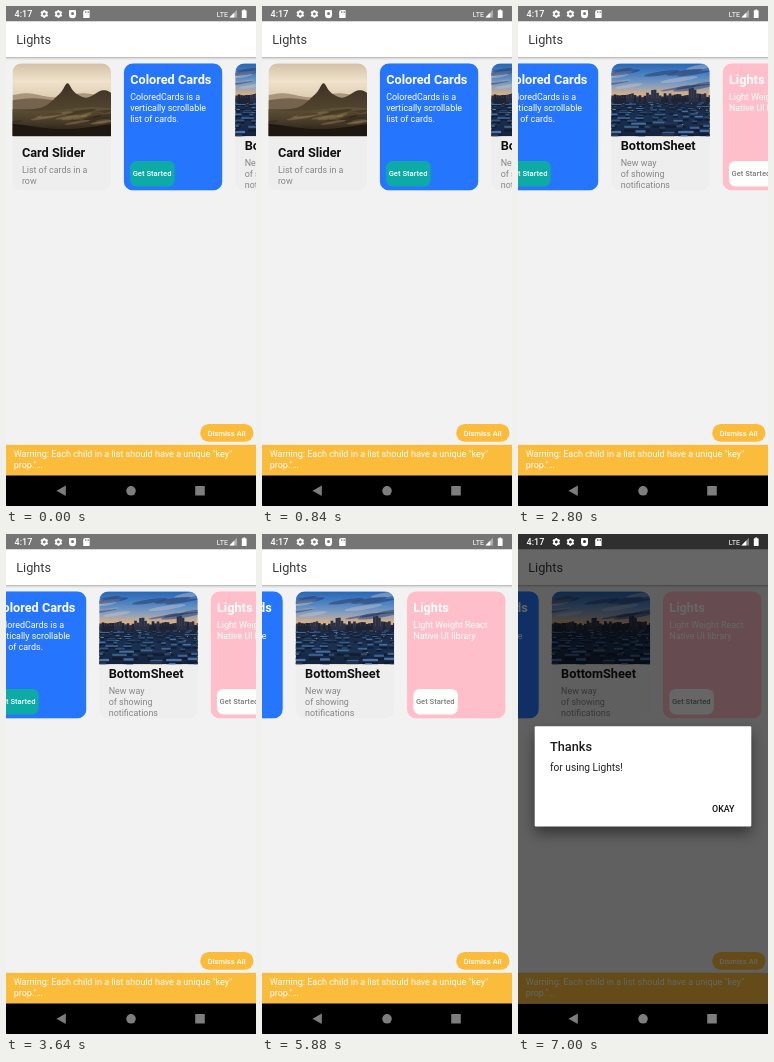
An HTML page with a canvas for the animation above (8.4 s loop, 250 by 500 pixels).

```html
<!DOCTYPE html>
<html lang="en">
<head>
<meta charset="utf-8">
<title>Lights</title>
<style>
html, body { margin: 0; width: 100%; height: 100%; overflow: hidden; background: #f2f2f2; }
canvas { display: block; width: 250px; height: 500px; }
</style>
</head>
<body>
<canvas id="stage"></canvas>
<script>
const W = 250, H = 500, STEP = 1400, STEPS = 6;
const DP = W * 2.75 / 1080;
const AMBER = '#fbbb3b';

// Layout in device-independent units
const STATUS = 24 * DP, HEADER = 80 * DP, NAV = H - 48 * DP;
const CARD_W = 155 * DP, CARD_H = 200 * DP, GAP = 10 * DP, PITCH = 175 * DP;
const PHOTO_H = 73, RADIUS = 15 * DP;
const SMALL = 12 * DP, BODY = 14 * DP, MEDIUM = 16 * DP, TITLE = 20 * DP;

const dpr = window.devicePixelRatio || 1;
const canvas = document.getElementById('stage');
canvas.width = W * dpr;
canvas.height = H * dpr;
const ctx = canvas.getContext('2d');
ctx.scale(dpr, dpr);

function rect(x, y, w, h, fill) {
  ctx.fillStyle = fill;
  ctx.fillRect(x, y, w, h);
}

function round(x, y, w, h, r, fill) {
  ctx.beginPath();
  ctx.roundRect(x, y, w, h, r);
  ctx.fillStyle = fill;
  ctx.fill();
}

function triangle(x1, y1, x2, y2, x3, y3, fill) {
  ctx.beginPath();
  ctx.moveTo(x1, y1);
  ctx.lineTo(x2, y2);
  ctx.lineTo(x3, y3);
  ctx.fillStyle = fill;
  ctx.fill();
}

function ellipse(x, y, rx, ry, fill, tilt = 0) {
  ctx.beginPath();
  ctx.ellipse(x, y, rx, ry, tilt, 0, 7);
  ctx.fillStyle = fill;
  ctx.fill();
}

function text(str, x, y, size, fill, weight = 400) {
  ctx.font = `${weight} ${size}px Roboto, sans-serif`;
  ctx.fillStyle = fill;
  ctx.fillText(str, x, y);
}

function lines(list, x, y, fill) {
  list.forEach((s, i) => text(s, x, y + i * 10.8, BODY, fill));
}

function fade(y0, y1, ...colors) {
  const g = ctx.createLinearGradient(0, y0, 0, y1);
  colors.forEach((c, i) => g.addColorStop(i / (colors.length - 1), c));
  return g;
}

function randomizer(seed) {
  return () => (seed = (seed * 16807) % 2147483647) / 2147483647;
}

const bump = (x, mid, width) => Math.exp(-(((x - mid) / width) ** 2));

// Fills everything below the curve
function ridge(curve, fill) {
  ctx.beginPath();
  ctx.moveTo(0, PHOTO_H);
  for (let x = 0; x <= 100; x++) ctx.lineTo(x, curve(x));
  ctx.lineTo(100, PHOTO_H);
  ctx.fillStyle = fill;
  ctx.fill();
}

function hills() {
  const rnd = randomizer(7);
  rect(0, 0, CARD_W, PHOTO_H, fade(0, 36, '#d3c1a6', '#f0e2cb', '#dccbb0'));
  ridge(x => 32 - 2 * Math.sin(x / 9), '#a8957c');
  ridge(x => 37 - 2 * Math.sin(x / 13), '#76634d');
  ridge(x => 46 - 19 * bump(x, 55, 17) - 7 * bump(x, 55, 4) - 19 * bump(x, 92, 17),
    fade(18, 50, '#3d3027', '#54472f'));
  ridge(x => 46 + 2 * Math.sin(x / 17), fade(45, PHOTO_H, '#5e5136', '#453a28', '#1c1611'));
  for (let i = 0; i < 18; i++) {
    const light = i % 2 ? 'rgba(142,120,80,.5)' : 'rgba(40,32,22,.4)';
    ellipse(rnd() * 98, 48 + rnd() * 12, 6 + rnd() * 14, 1 + rnd() * 1.5, light, -0.15);
  }
  ridge(x => 63 + 3 * Math.sin(x / 20 - 1), '#1e1712');
}

function city() {
  const rnd = randomizer(41);
  rect(0, 0, CARD_W, PHOTO_H, fade(0, 34, '#2867b4', '#4a82c2', '#8ba0bd', '#f0b575'));
  for (let i = 0; i < 16; i++) {
    const cloud = i % 3 ? 'rgba(38,55,96,.5)' : 'rgba(190,195,210,.45)';
    ellipse(rnd() * 98, 3 + rnd() * 22, 8 + rnd() * 14, 0.8 + rnd() * 1.6, cloud, -0.15);
  }
  rect(0, 35, CARD_W, 38, fade(35, PHOTO_H, '#1b2337', '#1a3154', '#14233c'));
  for (let x = 0; x < CARD_W; x += 2.5) {
    const h = 2 + rnd() * 4 + 10 * bump(x, 43, 7) * rnd() + 9 * bump(x, 80, 4);
    rect(x, 36 - h, 2.7, h + 3, rnd() < 0.5 ? '#1d2435' : '#2a3147');
  }
  // Snowy roofs, growing towards the viewer
  for (let y = 39; y < PHOTO_H; y += 1 + (y - 36) / 9) {
    const size = 1 + (y - 38) / 11;
    for (let x = -rnd() * 9; x < CARD_W; x += (4 + rnd() * 5) * size) {
      const w = (1.5 + rnd() * 4) * size;
      const blue = 60 + rnd() * 100;
      rect(x, y + rnd() * size, w, 0.7 * size, `rgb(${blue * 0.48},${blue * 0.75},${blue * 1.1})`);
      rect(x, y + size * 1.5, w, 0.8 * size, '#111c31');
      if (rnd() < 0.12) rect(x + w / 2, y + size, 0.9, 0.9, '#e0a45c');
    }
  }
}

function photoCard(scene, title, titleY, list) {
  rect(0, 0, CARD_W, CARD_H, '#eeeeee');
  ctx.save();
  ctx.beginPath();
  ctx.rect(0, 0, CARD_W, PHOTO_H);
  ctx.clip();
  scene();
  ctx.restore();
  text(title, 15 * DP, titleY, TITLE, '#111', 700);
  lines(list, 15 * DP, titleY + 16.4, '#868686');
}

function colorCard(bg, title, list, button, label) {
  rect(0, 0, CARD_W, CARD_H, bg);
  text(title, GAP, 20.3, TITLE, '#fff', 700);
  lines(list, GAP, 37, '#fff');
  round(GAP, 97.7, 70 * DP, 40 * DP, GAP, button);
  text('Get Started', 14 * DP, 113.1, SMALL, label, 500);
}

const cards = [
  () => photoCard(hills, 'Card Slider', 93.6, ['List of cards in a', 'row']),
  () => colorCard('#2675fe', 'Colored Cards',
    ['ColoredCards is a', 'vertically scrollable', 'list of cards.'], '#0eaaa6', '#fff'),
  () => photoCard(city, 'BottomSheet', 86.6, ['New way', 'of showing', 'notifications']),
  () => colorCard('#ffbfca', 'Lights', ['Light Weight React', 'Native UI library'], '#fff', '#7c7c7c')
];
const MAX_SCROLL = cards.length * PITCH - W;

function drawCards(offset) {
  cards.forEach((card, i) => {
    ctx.save();
    ctx.translate(GAP + i * PITCH - offset, HEADER + GAP);
    ctx.beginPath();
    ctx.roundRect(0, 0, CARD_W, CARD_H, RADIUS);
    ctx.clip();
    card();
    ctx.restore();
  });
}

function drawHeader() {
  rect(0, HEADER, W, 3.5, fade(HEADER, HEADER + 3.5, 'rgba(0,0,0,.28)', 'rgba(0,0,0,.07)', 'rgba(0,0,0,0)'));
  rect(0, 0, W, HEADER, '#fff');
  rect(0, 0, W, STATUS, '#757575');
  text('Lights', 16 * DP, 38.2, TITLE, '#3a3a3a');
}

function drawWarning() {
  round(194.2, 418, 53.3, 28 * DP, 14 * DP, AMBER);
  text('Dismiss All', 201.4, 429.8, SMALL, '#fff', 500);
  rect(0, 438.8, W, NAV - 438.8, AMBER);
  text('Warning: Each child in a list should have a unique "key"', 12 * DP, 451, 9.05, '#fff');
  text('prop."…', 12 * DP, 462.4, 9.05, '#fff');
}

function drawDialog() {
  rect(0, 0, W, NAV, 'rgba(0,0,0,.6)');
  ctx.save();
  ctx.shadowColor = 'rgba(0,0,0,.45)';
  ctx.shadowBlur = 14 * dpr;
  ctx.shadowOffsetY = 7 * dpr;
  round(16.7, 192.3, 216.6, 100.2, 2 * DP, '#fff');
  ctx.restore();
  text('Thanks', 32, 217.4, TITLE, '#1c1c1c', 500);
  text('for using Lights!', 32, 237, MEDIUM, '#222');
  text('OKAY', 194, 277.8, BODY, '#111', 500);
}

function gear(x, y) {
  ctx.strokeStyle = '#fff';
  ctx.lineWidth = 1.8;
  ctx.beginPath();
  ctx.arc(x, y, 2.3, 0, Math.PI * 2);
  for (let i = 0; i < 6; i++) {
    const a = (i + 0.5) * Math.PI / 3, c = Math.cos(a), s = Math.sin(a);
    ctx.moveTo(x + c * 2.6, y + s * 2.6);
    ctx.lineTo(x + c * 3.9, y + s * 3.9);
  }
  ctx.stroke();
}

function drawStatus(dark) {
  const bg = dark ? '#2f2f2f' : '#757575';
  text('4:17', 8.6, 11.2, 9, '#fff', 500);
  gear(38.3, 8);
  gear(52.4, 8);
  round(63, 4, 7, 8.2, [1, 1, 3.5, 3.5], '#fff');
  ellipse(66.5, 7.6, 1.5, 1.5, bg);
  round(77.2, 4, 6.4, 8, [2.2, 0.6, 0.6, 0.6], '#fff');
  for (let i = 0; i < 3; i++) rect(79.3 + i * 1.35, 5.2, 0.7, 1.7, bg);
  text('LTE', 210.8, 11.1, 7.1, '#fff');
  triangle(231, 3.8, 231, 11.4, 223.4, 11.4, 'rgba(255,255,255,.4)');
  triangle(228.3, 6.5, 228.3, 11.4, 223.4, 11.4, '#fff');
  rect(237.2, 3.5, 2, 1.2, '#fff');
  round(235.8, 4.3, 4.8, 7.8, 0.6, '#fff');
}

function drawNav() {
  const grey = '#7d7d7d', y = 484.8;
  rect(0, NAV, W, H - NAV, '#000');
  triangle(50.5, y, 59.8, y - 5.2, 59.8, y + 5.2, grey);
  ellipse(125, y, 4.8, 4.8, grey);
  round(189.2, y - 4.8, 9.6, 9.6, 0.6, grey);
}

function frame() {
  const step = Math.floor(performance.now() / STEP) % STEPS;
  const dialog = step === STEPS - 1;
  rect(0, 0, W, H, '#f2f2f2');
  drawCards(Math.min(step * 68, MAX_SCROLL));
  drawHeader();
  drawWarning();
  if (dialog) drawDialog();
  drawStatus(dialog);
  drawNav();
  requestAnimationFrame(frame);
}
frame();
</script>
</body>
</html>
```
